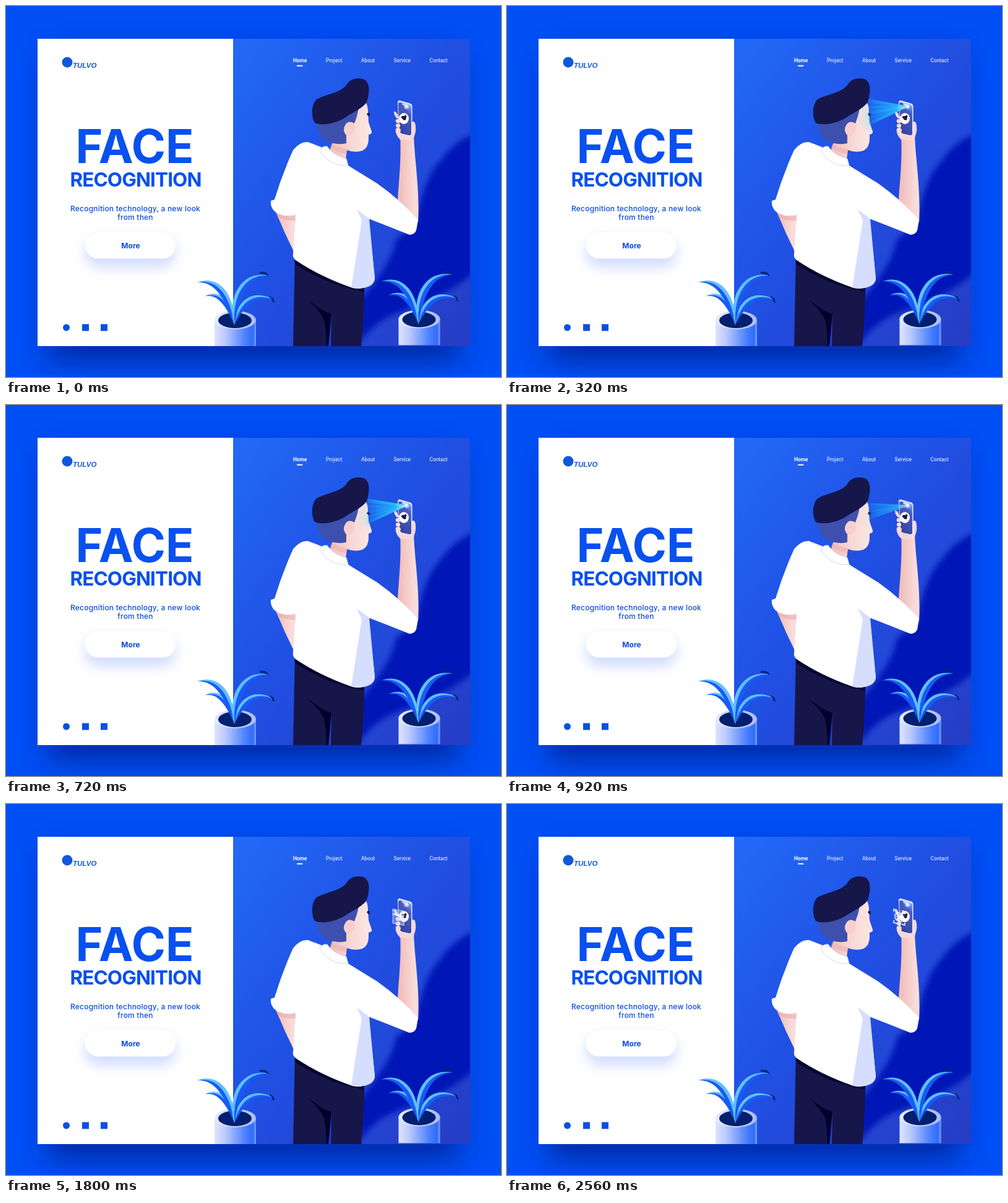
An HTML page for the animation above (3000 ms loop, 800 px wide and 600 px high).

```html
<!DOCTYPE html>
<html lang="en">
<head>
<meta charset="utf-8">
<title>Face recognition</title>
<style>
html, body { margin: 0; width: 100%; height: 100%; overflow: hidden; background: #0050f5; }
svg { display: block; width: 100%; height: 100%; }
.head { font-family: Inter, sans-serif; font-weight: 700; fill: #0850f0; text-anchor: middle; }
.mark { font: italic 700 11.5px "Liberation Sans", Arial, sans-serif; fill: #1157dc; }
.copy { font-family: Inter, sans-serif; font-size: 12px; fill: #0a4ce0; text-anchor: middle; }
.nav { font-family: Roboto, sans-serif; font-size: 8.3px; font-weight: 500; fill: #d3defc; }
</style>
</head>
<body>
<svg viewBox="0 0 800 600" xmlns="http://www.w3.org/2000/svg">
<defs>
  <linearGradient id="wall" x1="0" y1="0" x2="1" y2="1">
    <stop offset="0" stop-color="#226af8"/><stop offset=".45" stop-color="#2050e4"/><stop offset="1" stop-color="#263cc4"/>
  </linearGradient>
  <linearGradient id="pot">
    <stop offset="0" stop-color="#dfe5ff"/><stop offset=".25" stop-color="#bccaff"/><stop offset=".75" stop-color="#4a80fc"/>
    <stop offset=".93" stop-color="#2f6cfa"/><stop offset="1" stop-color="#7ea2fd"/>
  </linearGradient>
  <linearGradient id="rim">
    <stop offset="0" stop-color="#e6ebff"/><stop offset="1" stop-color="#a9bcfb"/>
  </linearGradient>
  <linearGradient id="face">
    <stop offset="0" stop-color="#f1bdbb"/><stop offset=".5" stop-color="#f8d6d3"/><stop offset="1" stop-color="#fce8e4"/>
  </linearGradient>
  <linearGradient id="arm">
    <stop offset="0" stop-color="#f0b9b7"/><stop offset=".8" stop-color="#f9dcd9"/>
  </linearGradient>
  <linearGradient id="screen" x1=".8" y1="0" x2=".3" y2="1">
    <stop offset="0" stop-color="#86a6fb"/><stop offset=".25" stop-color="#4a5cc4"/><stop offset="1" stop-color="#35429c"/>
  </linearGradient>
  <linearGradient id="ray" gradientUnits="userSpaceOnUse" x1="645" y1="163" x2="582" y2="174">
    <stop offset="0" stop-color="#a4f4ff"/><stop offset=".25" stop-color="#2cceff"/>
    <stop offset=".7" stop-color="#1cb4ff" stop-opacity=".75"/><stop offset="1" stop-color="#1aa6ff" stop-opacity=".12"/>
  </linearGradient>
  <radialGradient id="tint">
    <stop offset="0" stop-color="#9be6ee" stop-opacity=".6"/><stop offset="1" stop-color="#9be6ee" stop-opacity="0"/>
  </radialGradient>
  <radialGradient id="flare">
    <stop offset="0" stop-color="#fff"/><stop offset=".35" stop-color="#d9f4ff" stop-opacity=".9"/><stop offset="1" stop-color="#7cc4ff" stop-opacity="0"/>
  </radialGradient>
  <filter id="blurCard" x="-20%" y="-20%" width="140%" height="140%"><feGaussianBlur stdDeviation="23"/></filter>
  <filter id="blurButton" x="-40%" y="-100%" width="180%" height="300%"><feGaussianBlur stdDeviation="11"/></filter>
  <filter id="blurWall" x="-20%" y="-20%" width="140%" height="140%"><feGaussianBlur stdDeviation="4"/></filter>
  <clipPath id="panel"><rect x="367" y="53" width="383" height="497"/></clipPath>
  <clipPath id="card"><rect x="51" y="53" width="699" height="497"/></clipPath>
  <path id="faceShape" d="M528 220 C536 200 548 190 562 180 L566 168 Q575 165 582 157 Q585 162 585 172 L586 188 L591 203 Q592 207 586 208 L586 215 Q586 229 576 234 Q564 238 551 233 L549 248 Q532 252 519 239 Q526 231 528 220Z"/>
  <clipPath id="faceClip"><use href="#faceShape"/></clipPath>
  <g id="plant">
    <path d="M337 508 H404 V550 H337Z" fill="url(#pot)"/>
    <ellipse cx="370.500" cy="508" rx="33.500" ry="15" fill="url(#rim)"/>
    <ellipse cx="370" cy="508.500" rx="27" ry="12.500" fill="#02206f"/>
    <g id="leaves"></g>
    <path d="M410 430 Q422 428 425 437 Q418 433 410 433Z M426 469.500 Q434 471 434 480 L430 478 Q431 473 426 472Z" fill="#07247e"/>
  </g>
</defs>

<rect width="800" height="600" fill="#0050f5"/>
<rect x="66" y="76" width="668" height="500" rx="10" fill="#001f8a" opacity=".72" filter="url(#blurCard)"/>
<rect x="51" y="53" width="699" height="497" fill="#fff"/>
<g clip-path="url(#panel)">
  <rect x="367" y="53" width="383" height="497" fill="url(#wall)"/>
  <path d="M760 205 Q722 220 702 251 Q676 275 662 352 L630 378 Q625 408 598 444 L572 478 V545 Q596 508 640 493 Q705 475 760 428Z" fill="#0019b6" filter="url(#blurWall)"/>
</g>

<circle cx="99" cy="91" r="8.500" fill="#1157dc"/>
<text x="108" y="100" class="mark">TULVO</text>
<text x="208" y="253.500" class="head" font-size="75">FACE</text>
<text x="209.500" y="292" class="head" font-size="31.500" letter-spacing="-.9">RECOGNITION</text>
<g class="copy">
  <g font-weight="500" letter-spacing=".2">
    <text x="209" y="332">Recognition technology, a new look</text>
    <text x="209" y="346">from then</text>
  </g>
  <rect x="128" y="376" width="146" height="46" rx="23" fill="#3c6cff" opacity=".25" filter="url(#blurButton)"/>
  <rect x="128" y="366" width="146" height="42.500" rx="21.250" fill="#fff"/>
  <text x="201.500" y="391.500" font-weight="700">More</text>
</g>
<g fill="#0a50e2">
  <circle cx="97.500" cy="520" r="5.500"/>
  <rect x="123" y="514.500" width="11" height="11"/>
  <rect x="153" y="514.500" width="11" height="11"/>
</g>
<g class="nav">
  <text x="464" y="91" font-weight="700" style="fill:#fff">Home</text>
  <text x="517" y="91">Project</text>
  <text x="574" y="91">About</text>
  <text x="626.500" y="91">Service</text>
  <text x="684.500" y="91">Contact</text>
  <rect x="470" y="95.800" width="9.500" height="1.900" rx=".9" fill="#fff"/>
</g>

<g clip-path="url(#card)">
  <!-- trousers -->
  <path d="M467 400 L579 452 Q580 490 574 552 H464Z" fill="#16164a"/>
  <path d="M466 404 Q500 434 579 454 V462 Q520 452 467 417Z" fill="#05052f"/>
  <path d="M487 475 L510 491 Q518 496 526 498 L523 552 H518 Q518 524 514 508 Q507 492 487 475Z" fill="#00002d"/>
  <path d="M526 498 L525 552 H521Z" fill="#1d3fd0"/>
  <!-- arms -->
  <path d="M436 333 L468 336 L466 399 Q450 367 436 333Z" fill="url(#arm)"/>
  <path d="M436 334 Q450 342 467 339 V347 Q451 348 440 342Z" fill="#e9a9a6" opacity=".55"/>
  <path d="M637 209 H659 C660 245 669 300 666 349 L633 313 C635 280 639 250 637 209Z" fill="url(#arm)"/>
  <!-- head -->
  <use href="#faceShape" fill="url(#face)"/>
  <path d="M526 223 Q537 229 552 232 L549 240 Q534 236 524 230Z" fill="#eeb1af" opacity=".6"/>
  <g clip-path="url(#faceClip)"><ellipse id="glow" cx="588" cy="180" rx="22" ry="29" fill="url(#tint)"/></g>
  <path d="M502 188 Q528 193 550 180 L570 165 Q568 178 563 190 Q553 184 548 193 Q543 201 550 209 V222 Q532 226 516 217 Q503 208 502 188Z" fill="#3e50ad"/>
  <path d="M549 193 Q555 186 562 190 Q567 200 558 209 Q551 212 548 205Z" fill="#f7cfcc"/>
  <path d="M583 175 Q585 171 588 174 L588 178 Q585 179 583 175Z" fill="#17185a"/>
  <path d="M499 189 C493 180 493 159 502 151 C515 143 540 141 550 128 C555 118 567 115 577 118 C589 122 588 140 583 155 C575 167 560 172 549 180 C532 191 508 194 499 189Z" fill="#16164a"/>
  <!-- shirt -->
  <path d="M464 233 Q475 219 488 220 L509 228 L522 239 L553 258 L600 287 Q638 314 666 346 L663 363 Q660 370 652 370 Q620 357 586 344 L596 441 Q595 449 587 453 Q573 459 560 456 Q508 438 468 411 Q463 407 464 401 L468 337 Q449 343 434 332 Q427 325 428 315 L434 313 Q446 273 464 233Z" fill="#fff"/>
  <path d="M567 329 L587 344 L596 441 Q595 449 587 453 Q573 459 558 455 L575 347Z" fill="#d5deff"/>
  <path d="M507 234 Q510 226 519 227 Q529 242 550 247 L553 258 Q523 260 507 234Z" fill="#fff" stroke="#cdd9fb" stroke-width="1"/>
  <!-- hand and phone -->
  <path d="M637 216 Q628 207 630 198 L655 190 Q658 184 661 189 Q664 200 660 210 L658 218Z" fill="#f8d8d5"/>
  <path d="M633 157 Q633 152 637 153 L653 157.500 Q656.500 159 656.500 162 V206 Q656 211 652 210 L639 207 Q635 206 635 202Z" fill="#e5ebff"/>
  <path d="M634 159 Q634 155 638 156 L651.500 159.500 Q655 160.500 655 164 V207 Q654.500 209.500 651 209 L640 206.500 Q637 205.500 636 202Z" fill="url(#screen)"/>
  <path d="M640 157 L649 159.500 L648 162 L641 160Z" fill="#e5ebff"/>
  <ellipse cx="643" cy="182" rx="8" ry="9" fill="#fff"/>
  <path d="M638.500 180 Q640 177 643 178 L646 176.500 Q648.500 178 646.500 181 V184 Q643 186 641 183Z" fill="#17173f"/>
  <g fill="#f9dad7">
    <path d="M627 171 Q629 169 632 174 L635 181 L632 182 Q627 177 627 171Z"/>
    <ellipse cx="633.500" cy="186" rx="3.800" ry="3.300"/>
    <ellipse cx="633.500" cy="193.500" rx="3.600" ry="3.300"/>
    <ellipse cx="634.500" cy="201" rx="3.400" ry="3.300"/>
  </g>
  <g id="beam" fill="url(#ray)"></g>
  <circle cx="647.500" cy="162.500" r="6" fill="url(#flare)"/>
  <g id="glass" stroke="#fff" fill="none">
    <rect id="pane" x="-9" y="-11.500" width="18" height="23" rx="1" fill="#cfdcff" stroke-width=".8"/>
    <path id="band" d="M-9 0H9" stroke-width="2.500"/>
    <path id="marks" d="M-9 -7V-11H-4 M4 -11H9V-7 M9 7V11H4 M-4 11H-9V7" stroke-width="1.400"/>
    <g id="target" stroke-width="1.300">
      <circle id="ring" r="7" pathLength="1" stroke-dasharray="1"/>
      <path d="M-4 -3L4 4 M4 -4L-3 5 M-5 1Q0 -4 5 1"/>
    </g>
  </g>
</g>
<use href="#plant"/>
<use href="#plant" x="297.500" y="-1.500"/>
</svg>
<script>
const LOOP = 3000, STEP = 40, LAST = 2560;
const $ = id => document.getElementById(id);
const set = (id, name, value) => $(id).setAttribute(name, value);
const ramp = (t, a, b) => Math.min(1, Math.max(0, (t - a) / (b - a)));
const ease = p => p * p * (3 - 2 * p);
const mix = (a, b, p) => a + (b - a) * p;

function addPath(parent, attrs) {
  const path = document.createElementNS("http://www.w3.org/2000/svg", "path");
  for (const name in attrs) path.setAttribute(name, attrs[name]);
  $(parent).append(path);
  return path;
}

// A leaf follows a cubic spine: light above it, blue below.
function leaf(x0, y0, x1, y1, x2, y2, x3, y3, width) {
  const cubic = (a, b, c, d, u) => {
    const v = 1 - u;
    return v * v * v * a + 3 * v * v * u * b + 3 * v * u * u * c + u * u * u * d;
  };
  const side = Math.sign(x3 - x0);
  const spine = [], upper = [], lower = [];
  for (let i = 0; i <= 24; i++) {
    const u = i / 24;
    const at = k => [cubic(x0, x1, x2, x3, k), cubic(y0, y1, y2, y3, k)];
    const [x, y] = at(u), [ax, ay] = at(u - .01), [bx, by] = at(u + .01);
    const half = width * Math.sin(Math.PI * u ** .85) * side / Math.hypot(bx - ax, by - ay);
    const nx = (by - ay) * half, ny = (ax - bx) * half;
    spine.push([x, y]);
    upper.unshift([x + nx * .85, y + ny * .85]);
    lower.unshift([x - nx, y - ny]);
  }
  const shape = edge => "M" + spine.concat(edge).map(p => p.map(n => n.toFixed(1)).join(" ")).join("L") + "Z";
  addPath("leaves", { d: shape(lower), fill: "#165cf6" });
  addPath("leaves", { d: shape(upper), fill: "#62bffc" });
}
leaf(369, 515, 363, 482, 345, 460, 321, 469.5, 5);
leaf(369, 515, 362, 466, 340, 440, 309, 447, 6);
leaf(369, 516, 377, 482, 398, 460, 435, 476, 5.5);
leaf(369, 516, 366, 475, 382, 432, 425, 436, 6.5);

// The first wedge is the whole fan, the others are its rays.
const wedges = [[-1, 1, .5], [-1, -.72, .7], [-.5, -.25, .55], [-.1, .2, .65], [.34, .55, .6], [.7, 1, .9]]
  .map(([top, bottom, alpha]) => ({ path: addPath("beam", {}), top, bottom, alpha }));

function drawBeam(t) {
  const reach = ease(ramp(t, 0, 280));
  const narrow = ease(ramp(t, 620, 1120));
  const level = reach * (1 - ease(ramp(t, 800, 1140)));
  const spread = mix(22, 9, narrow);
  const x = mix(645, 584, reach);
  const endY = k => mix(163, 172 + k * spread, reach);
  wedges.forEach((w, i) => {
    const shimmer = i ? .8 + .2 * Math.sin(t / 120 + i * 1.9) : 1;
    w.path.setAttribute("d", `M646 161.5L${x} ${endY(w.top)}L${x} ${endY(w.bottom)}L645 164.5Z`);
    w.path.setAttribute("opacity", w.alpha * shimmer);
  });
  set("beam", "opacity", level);
  set("glow", "opacity", level * (1 - narrow));
}

function drawGlass(t) {
  const out = ease(ramp(t, 1120, 1280));
  const left = ease(ramp(t, 1200, 1720));
  const scan = ease(ramp(t, 2160, 2520));
  const x = 643 - 4 * out - 5 * left;
  const y = mix(180, 183, left);
  set("glass", "transform", `matrix(${mix(1.25, 1, left)} .2 0 1 ${x} ${y})`);
  set("glass", "opacity", out);
  set("pane", "fill-opacity", mix(mix(.5, .38, left), .12, scan));
  set("pane", "stroke-opacity", mix(.7, .1, scan));
  set("band", "transform", `translate(0 ${9 * Math.sin((t - 1240) / 160)})`);
  set("band", "opacity", .75 * (1 - scan));
  set("marks", "opacity", mix(.35, 1, scan));
  set("target", "opacity", scan);
  set("ring", "stroke-dashoffset", 1 - scan);
}

function frame(now) {
  const t = Math.min(LAST, Math.floor((now % LOOP) / STEP) * STEP);
  drawBeam(t);
  drawGlass(t);
  requestAnimationFrame(frame);
}
frame(0);
</script>
</body>
</html>
```
